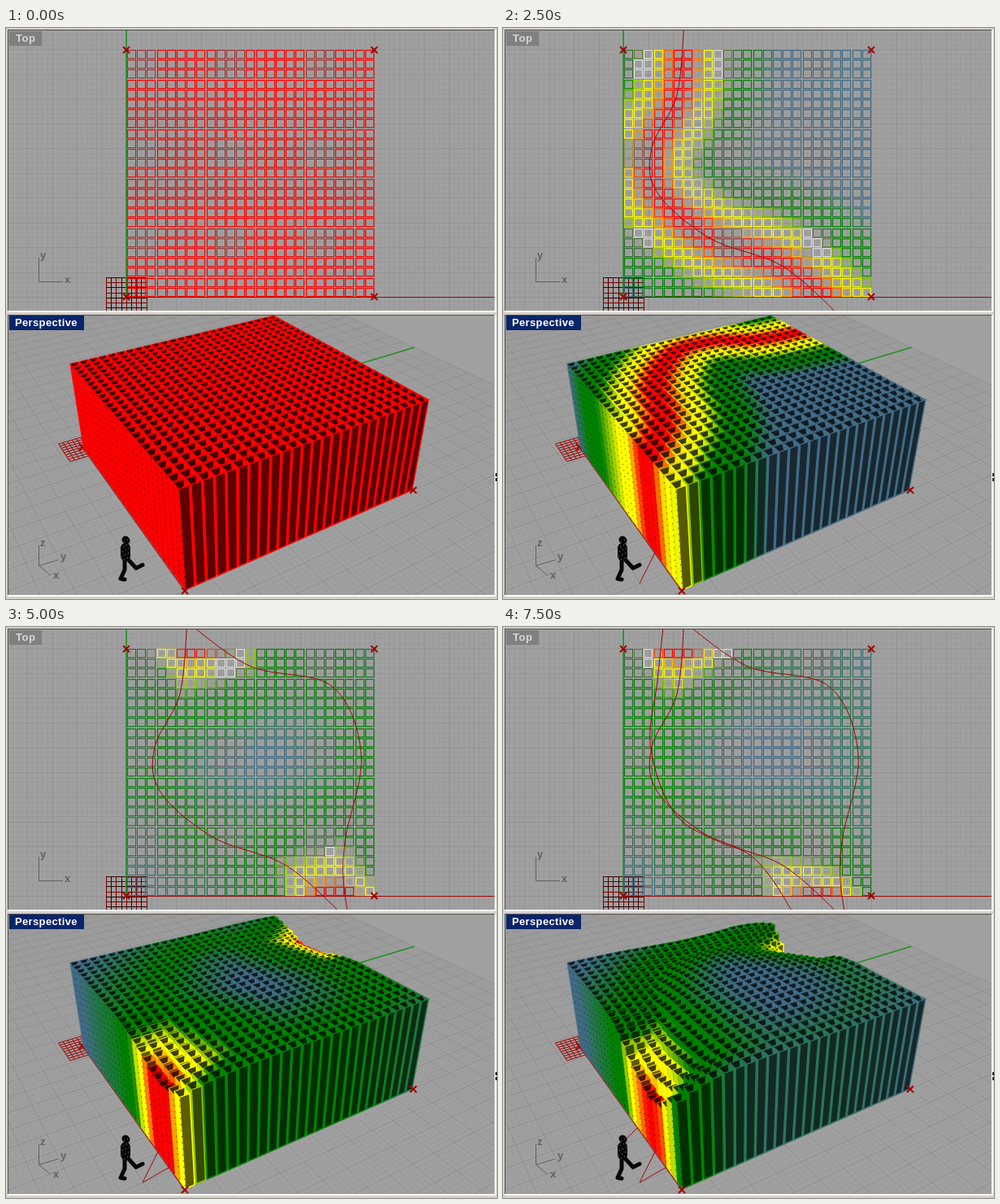
Write an HTML page with a canvas that moves like this. It is 604x703 px and loops after 8 s.

```html
<!DOCTYPE html>
<html lang="en">
<head>
<meta charset="utf-8">
<title>Walking paths over a column field</title>
<style>
  html, body { margin: 0; width: 100%; height: 100%; overflow: hidden; background: #d4d0c8; }
  canvas { display: block; width: 604px; height: 703px; }
</style>
</head>
<body>
<canvas id="stage" width="604" height="703"></canvas>
<script>
const ctx = document.getElementById('stage').getContext('2d');
const N = 25, SIDE = 305, PITCH = SIDE / N, X0 = 148, Y0 = 331;
const STEP = 500, STEPS = 16, WALK_STEPS = 5, REACH = 118;
const FONT = '"Liberation Sans", Arial, sans-serif';
const DARK_RED = '#a00000', LABEL = '#606060';

// Key points of three walks in plan view, one walk after the other
const WALKS = [
  [[422,362], [345,294], [255,259], [190,203], [183,148], [214,82], [223,-10]],
  [[422,362], [415,310], [418,258], [437,157], [401,73], [300,48], [218,-10]],
  [[360,357], [308,284], [218,237], [182,150], [190,66], [198,-10]]
].map(smooth);

const BLUE = [66,108,134], GREEN = [0,130,0], YELLOW = [255,255,0], RED = [255,0,0];
const HEAT = [[0.03, BLUE], [0.27, GREEN], [0.47, GREEN], [0.64, YELLOW], [0.75, YELLOW], [0.92, RED]];

function mix(a, b, k) { return a.map((c, i) => c + (b[i] - c) * k); }
function css(c, k = 1) { return `rgb(${c.map(v => Math.round(v * k)).join()})`; }

function heatColor(t) {
  const i = HEAT.findIndex(s => s[0] >= t);
  if (i < 0) return RED;
  if (i === 0) return BLUE;
  const [ta, a] = HEAT[i - 1], [tb, b] = HEAT[i];
  return mix(a, b, (t - ta) / (tb - ta));
}

// Catmull-Rom curve through all points
function smooth(pts) {
  const out = [pts[0]], at = i => pts[Math.max(0, Math.min(pts.length - 1, i))];
  for (let i = 0; i < pts.length - 1; i++) {
    const [a, b, c, d] = [at(i - 1), at(i), at(i + 1), at(i + 2)];
    for (let s = 0.05; s < 1.01; s += 0.05) {
      out.push([0, 1].map(n => 0.5 * (2 * b[n] + (c[n] - a[n]) * s
        + (2 * a[n] - 5 * b[n] + 4 * c[n] - d[n]) * s * s
        + (3 * b[n] - a[n] - 3 * c[n] + d[n]) * s * s * s)));
    }
  }
  return out;
}

// The part of a curve walked at constant speed
function walked(pts, share) {
  const gap = i => Math.hypot(pts[i][0] - pts[i - 1][0], pts[i][1] - pts[i - 1][1]);
  let left = share * pts.reduce((sum, _, i) => sum + (i ? gap(i) : 0), 0);
  return pts.filter((_, i) => !i || (left -= gap(i)) > -1);
}

// Camera: field coordinates u, v, z (0..1) to the screen
function project(u, v, z = 0) {
  const w = 1 - 0.2725 * u + 0.1643 * v - 0.078 * z;
  return [(94 + 66.05 * u + 286.7 * v - 22.46 * z) / w,
          (516 - 11.84 * u + 3.28 * v - 134.9 * z) / w];
}
const toField = ([x, y]) => project((x - X0) / SIDE, (Y0 - y) / SIDE);

function path(pts, close) {
  ctx.beginPath();
  pts.forEach(p => ctx.lineTo(p[0], p[1]));
  if (close) ctx.closePath();
}
function line(color, width, ...pts) {
  ctx.strokeStyle = color;
  ctx.lineWidth = width;
  path(pts);
  ctx.stroke();
}
function shape(pts, fill, edge, width = 1) {
  path(pts, true);
  if (fill) { ctx.fillStyle = fill; ctx.fill(); }
  if (edge) { ctx.strokeStyle = edge; ctx.lineWidth = width; ctx.stroke(); }
}
function rect(x, y, w, h, fill) {
  ctx.fillStyle = fill;
  ctx.fillRect(x, y, w, h);
}
function text(s, x, y, color = LABEL, spacing = '0px') {
  ctx.font = 'bold 13px ' + FONT;
  ctx.letterSpacing = spacing;
  ctx.fillStyle = color;
  ctx.fillText(s, x, y);
}
function cross([x, y]) {
  line(DARK_RED, 2, [x - 4, y - 4], [x + 4, y + 4]);
  line(DARK_RED, 2, [x - 4, y + 4], [x + 4, y - 4]);
}
function panel(x, y, w, h, draw) {
  rect(x - 1, y - 1, w + 2, h + 2, '#505050');
  rect(x - 1, y + h, w + 3, 2, '#fff');
  rect(x + w, y - 1, 2, h + 2, '#fff');
  ctx.save();
  ctx.beginPath();
  ctx.rect(x, y, w, h);
  ctx.clip();
  rect(x, y, w, h, '#a0a0a0');
  draw();
  ctx.restore();
}

// Heat and height of every column after a given step
function field(step) {
  const trails = WALKS.map((w, n) => walked(w, Math.min(1, (step / WALK_STEPS) - n)))
    .filter((_, n) => step > n * WALK_STEPS);
  const cells = [];
  for (let i = 0; i < N; i++) for (let j = 0; j < N; j++) {
    const x = X0 + (i + 0.5) * PITCH, y = Y0 - (j + 0.5) * PITCH;
    let load = 0;
    for (const t of trails) {
      const d = Math.min(...t.map(p => Math.hypot(p[0] - x, p[1] - y)));
      load += Math.max(0, 1 - d / REACH);
    }
    // shared walks crowd together at both gates
    if (trails.length > 1) load *= 1 + 0.35 * Math.abs(2 * (j + 0.5) / N - 1) ** 4;
    cells.push({ i, j, load });
  }
  const max = Math.max(...cells.map(c => c.load));
  const focus = 1 + 0.4 * (trails.length - 1);
  for (const c of cells) {
    c.heat = max ? (c.load / max) ** focus : 1;
    c.top = trails.length > 1 ? 1 - Math.min(0.6, 0.015 * c.load ** 3) : 1;
  }
  return { trails, cells };
}

function planView({ trails, cells }) {
  for (let k = -80; k < 80; k++) {
    const color = k % 5 ? '#9a9a9a' : '#929292';
    const x = Math.round(X0 + k * PITCH / 2) + 0.5, y = Math.round(Y0 + k * PITCH / 2) + 0.5;
    line(color, 1, [x, 0], [x, 350]);
    line(color, 1, [0, y], [604, y]);
  }
  for (let k = 0; k <= 8; k++) {
    const x = Math.round(123 + k * 6.2) + 0.5, y = Math.round(307 + k * 6.2) + 0.5;
    line(k % 2 ? '#300000' : '#800000', 1, [x, 307], [x, 357]);
    line(k % 2 ? '#800000' : '#300000', 1, [123, y], [173, y]);
  }
  line(DARK_RED, 1.2, [X0, 331.5], [602, 331.5]);
  line('#109010', 1.5, [148, 0], [148, 331]);
  for (const { i, j, heat } of cells) {
    const faint = i % 9 < 3 && (N - 1 - j) % 9 < 3;
    const pale = heat > 0.55 && heat < 0.72;
    let c = heatColor(heat);
    if (faint) c = pale ? [228, 228, 228] : mix(c, [80, 80, 80], 0.55);
    ctx.strokeStyle = css(c);
    ctx.lineWidth = faint ? 1 : 1.25;
    ctx.strokeRect(Math.round(X0 + i * PITCH) + 1.5, Math.round(Y0 - (j + 1) * PITCH) + 1.5, 10, 10);
  }
  trails.forEach(t => line(DARK_RED, 1, ...t));
  for (const x of [148, 453]) for (const y of [27, 331]) cross([x, y]);
  line(LABEL, 1, [40.5, 283], [40.5, 312.5], [70, 312.5]);
  text('y', 42, 284);
  text('x', 72, 314);
  rect(4, 4, 40, 18, '#808080');
  text('Top', 12, 17, '#d8d8d8', '0.5px');
}

function column({ i, j, heat, top }) {
  const c = heatColor(heat), lit = css(c), dim = css(c, 0.36);
  const u0 = (i + 0.08) / N, u1 = (i + 0.92) / N, v0 = (j + 0.08) / N, v1 = (j + 0.92) / N;
  const a = project(u0, v0, top), b = project(u1, v0, top);
  const d = project(u1, v1, top), e = project(u0, v1, top);
  const footB = project(u1, v0), footD = project(u1, v1);
  shape([a, b, footB, project(u0, v0)], lit, lit, 0.7);
  shape([b, d, footD, footB], dim, lit, 1.5);
  // open tube: far walls seen through the mouth
  shape([a, b, d, e], lit);
  shape([a, e, mix(b, d, 0.45), b], css(c, 0.25));
  shape([a, b, d, e], null, lit, 1);
  if (j === 0) {
    ctx.setLineDash([1.5, 6]);
    ctx.lineDashOffset = i * 3;
    line(dim, 1, b, footB);
    ctx.setLineDash([]);
  }
}

function walker() {
  const ink = '#080808';
  ctx.lineCap = ctx.lineJoin = 'round';
  line(ink, 9, [147, 630], [148, 631]);
  line(ink, 12, [147, 640], [147, 650]);
  line(ink, 5, [146, 653], [146, 667], [141, 678], [146, 679]);
  line(ink, 5, [149, 653], [160, 665], [168, 661]);
  ctx.lineCap = 'butt';
  ctx.lineJoin = 'miter';
  for (let k = 0; k < 14; k++) rect(142 + (k * 7) % 11, 628 + k * 2, 1, 1, '#777');
}

function perspectiveView({ trails, cells }) {
  for (let k = -100; k <= 100; k++) {
    const s = k / 50, color = k % 5 ? 'rgba(135,135,135,.28)' : 'rgba(118,118,118,.5)';
    line(color, 0.8, project(s, -2), project(s, 2));
    line(color, 0.8, project(-2, s), project(2, s));
  }
  for (let k = -4; k <= 4; k++) {
    const s = k * 0.0205;
    line(DARK_RED, 1, project(s, -0.082), project(s, 0.082));
    line(DARK_RED, 1, project(-0.082, s), project(0.082, s));
  }
  line('#209020', 1.5, project(0, 0), project(0, 2));
  line('#903030', 1.5, project(0, 0), project(1, 0));
  trails.forEach(t => line(DARK_RED, 1, ...t.map(toField)));
  cross(project(0, 0));
  [...cells].sort((p, q) => p.i - q.i || q.j - p.j).forEach(column);
  cross(project(1, 0));
  cross(project(1, 1));
  walker();
  line(LABEL, 1, [40.5, 637], [40.5, 662], [64, 655]);
  line(LABEL, 1, [40.5, 662], [55, 674]);
  text('z', 42, 638);
  text('y', 67, 655);
  text('x', 58, 678);
  rect(4, 354, 92, 18, '#0a246a');
  text('Perspective', 11, 367, '#fff', '0.35px');
}

function render(step) {
  const state = field(step);
  rect(0, 0, 604, 703, '#d4d0c8');
  panel(3, 3, 598, 345, () => planView(state));
  panel(3, 354, 598, 344, () => perspectiveView(state));
  rect(602, 548, 2, 4, '#222');
  rect(602, 554, 2, 4, '#222');
}

let shown = -1;
function tick() {
  const step = Math.floor(performance.now() / STEP) % STEPS;
  if (step !== shown) render(shown = step);
  requestAnimationFrame(tick);
}
tick();
</script>
</body>
</html>
```
